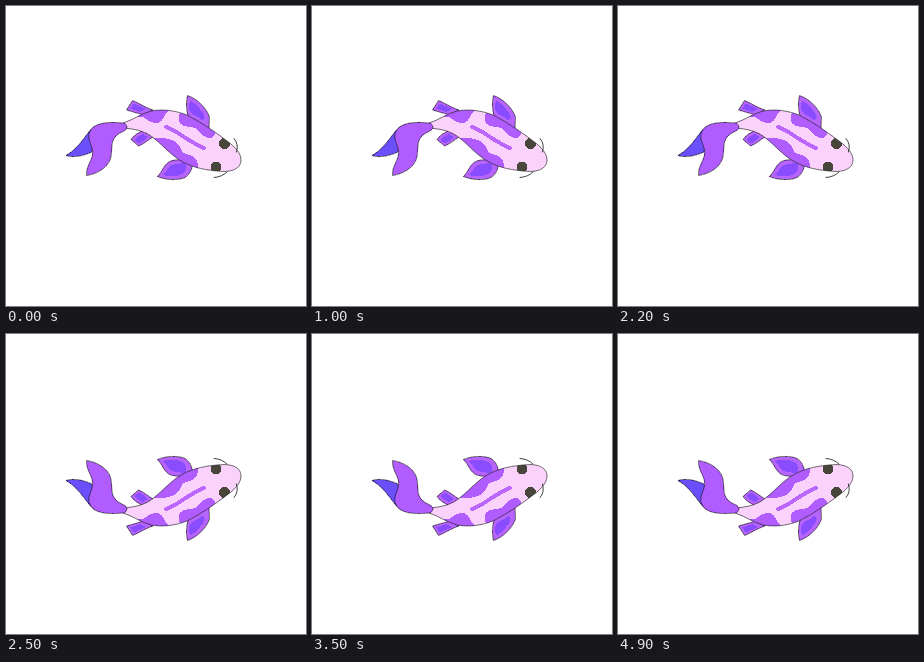
These frames come from a looping animation (300x300 px, 5 s). An HTML page:

```html
<!DOCTYPE html>
<html lang="en">
<head>
<meta charset="utf-8">
<title>Swimming koi</title>
<style>
  html, body { margin: 0; width: 100%; height: 100%; overflow: hidden; background: #fff; }
  svg { display: block; width: 100vw; height: 100vh; shape-rendering: crispEdges; }
  .line { stroke: #111; stroke-width: .6; stroke-linejoin: round; }
  .pink { fill: #fad2fb; }
  .purple { fill: #b05cff; }
  .fin { fill: #b764fc; }
  .violet { fill: #8a4cff; }
  .blue { fill: #6a4ffb; }
  .eye { fill: #48463a; }
  .stroke { fill: none; stroke-linecap: round; }
</style>
</head>
<body>
<svg viewBox="0 0 300 300">
  <defs>
    <path id="body" d="M117 117C127 114 134 108 145 105C156 103 168 104 181 109C197 117 212 128 225 138C232 144 235 149 235 154C235 161 229 165 219 165.500C206 165 192 163 181 158C167 152 159 141 147 131.500C139 125 129 123 117 122Z"/>
    <clipPath id="skin"><use href="#body"/></clipPath>
  </defs>
  <g id="fish">
    <g class="line fin">
      <path d="M120.500 104L126.500 94.500C133 97 138 101 147 104L138 109C132 107 126 106 120.500 104Z"/>
      <path d="M125 133.500C128 129 132 127 137 124.500L147 131C142 134 138 138 132.500 140Z"/>
      <path d="M181.500 89.500C192 93 201 103 203.500 111L203 123L182 110C180 103 180 95 181.500 89.500Z"/>
      <path d="M151.500 170.500C158 164 158 155 169 154L185 153C188 160 185 167 180 171C173 175 159 174 151.500 170.500Z"/>
    </g>
    <g class="violet">
      <path d="M124 102.500L128 97.500C132 99 135 101 140 103L134 106Z"/>
      <path d="M128.500 134C131 131 134 129 137 128L142 131C138 134 136 136 133 137.500Z"/>
      <path d="M184 94.500C191 98 197 105 199 112L196 114C192 110 187 109 185 107C182 103 183 98 184 94.500Z"/>
      <path d="M157 169C161 165 163 159 169 158L179 157C182 161 180 165 176 168C170 171 163 171 157 169Z"/>
    </g>
    <use href="#body" class="pink"/>
    <g clip-path="url(#skin)">
      <g class="purple">
        <path d="M132 111C139 109 141 116 148 117C155 118 157 113 159 109C161 106 162 105 165 102H132Z"/>
        <path d="M176 104C171 110 172 118 177 119.500C183 122 188 120 192 124C196 128 198 132 204 132C208 132 210 128 209 124L190 104Z"/>
        <path d="M147 132C157 132 164 132 170 136C176 141 174 147 180 148C187 149 191 153 192 158L192 168H170Z"/>
      </g>
      <g class="eye">
        <circle cx="218.500" cy="137.500" r="5.500"/>
        <circle cx="210" cy="161" r="5.500"/>
      </g>
    </g>
    <path class="stroke" stroke="#bb66fd" stroke-width="4" d="M160 121C171 124 179 134 198 142"/>
    <use href="#body" class="line" fill="none"/>
    <g class="line">
      <path class="blue" d="M89 120C81 125 75 141 60 149.500C68 152 77 150 86 146Z"/>
      <path class="purple" d="M117 117C107 116 96 116 89 120C84 123 82 128 83 133C85 140 88 144 86 151C84 157 80 162 80.500 169.500C91 168 101 162 104 154C107 147 104 137 109 131C113 126 119 126 121 122C121 119 119 117 117 117Z"/>
    </g>
    <path class="stroke" stroke="#111" stroke-width=".8" d="M228 132.500Q233 138 230.500 146M208 171.500Q216 171 221 166"/>
  </g>
</svg>
<script>
  const HALF_BEAT = 500;
  const fish = document.getElementById('fish');

  // The fish swims by flipping about the line y = 148 every half beat.
  function draw() {
    const flipped = Math.floor(performance.now() / HALF_BEAT) % 2;
    fish.setAttribute('transform', flipped ? 'matrix(1 0 0 -1 0 296)' : '');
    requestAnimationFrame(draw);
  }
  draw();
</script>
</body>
</html>
```
